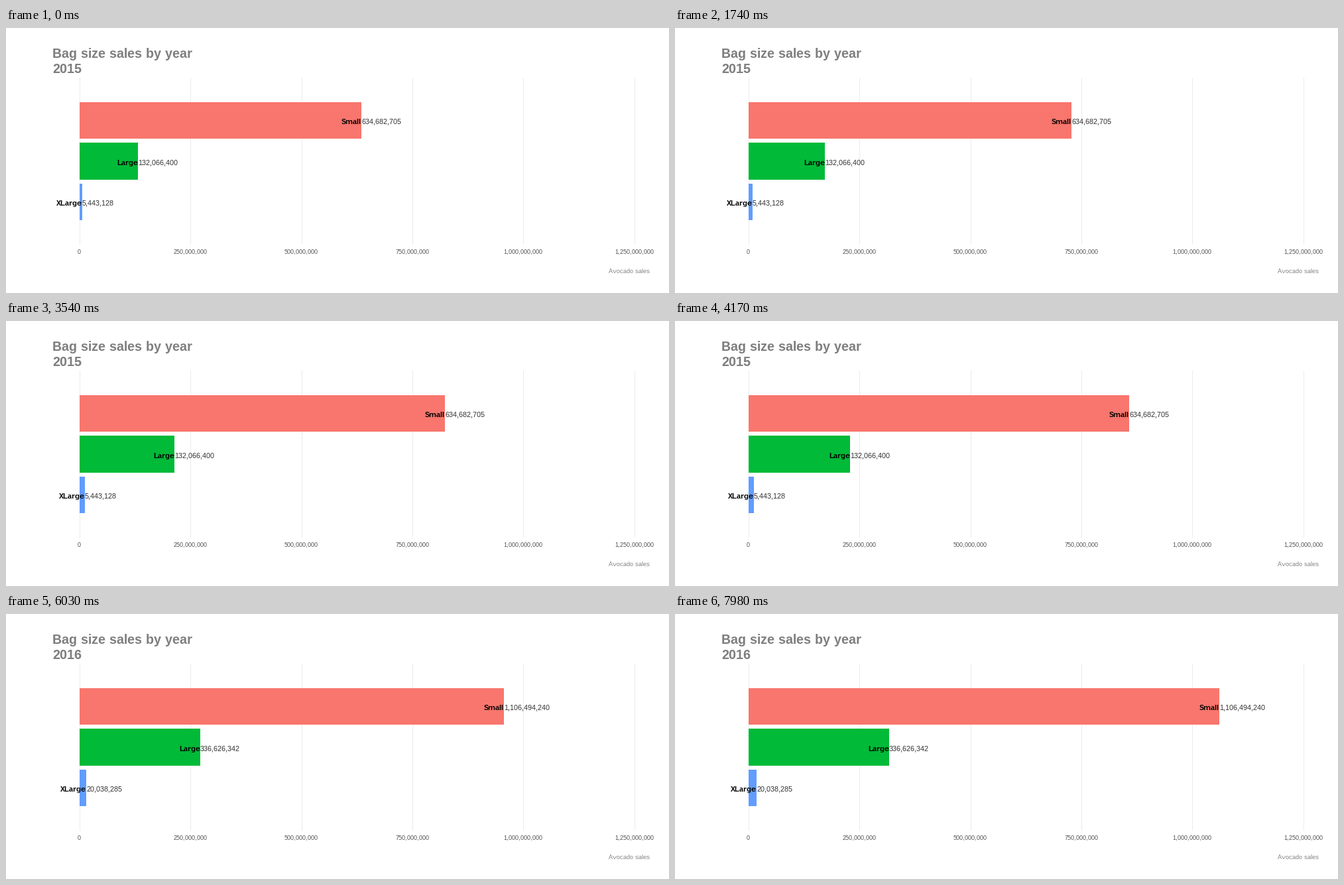
These frames come from a looping animation (1000 by 400 pixels, 8 s). A matplotlib script:

```python
import matplotlib.pyplot as plt
from matplotlib.animation import FuncAnimation
from matplotlib.patches import Rectangle

plt.rcParams.update({
    "font.family": "Liberation Sans",
    "text.hinting": "native",
    "text.hinting_factor": 1,
})

WIDTH, HEIGHT, DPI = 1000, 400, 100
LOOP_MS, TICK_MS, STEP_MS = 8000, 20, 30
STEPS_PER_YEAR = 295.5
ZERO_X, PX_PER_MILLION = 111, 0.6698

# name, colour, top, bottom, sales in 2015 and 2016
BARS = [
    ("Small", "#F8766D", 112, 167, (634_682_705, 1_106_494_240)),
    ("Large", "#00BA38", 173, 229, (132_066_400, 336_626_342)),
    ("XLarge", "#619CFF", 235, 290, (5_443_128, 20_038_285)),
]

fig = plt.figure(figsize=(WIDTH / DPI, HEIGHT / DPI), dpi=DPI, facecolor="white")
ax = fig.add_axes([0, 0, 1, 1])
ax.set(xlim=(0, WIDTH), ylim=(HEIGHT, 0))
ax.axis("off")


def to_x(sales):
    return ZERO_X + sales / 1e6 * PX_PER_MILLION


def box(x, top, width, bottom, color):
    return ax.add_patch(Rectangle((x, top), width, bottom - top, color=color,
                                  linewidth=0, antialiased=False))


def label(x, baseline, text, px, color, **kwargs):
    return ax.text(x, baseline, text, fontsize=px * 72 / DPI, color=color,
                   va="baseline", **kwargs)


for sales in range(0, 1_250_000_001, 250_000_000):
    x = to_x(sales)
    box(int(x + 0.1), 75, 1, 327, "#EBEBEB")
    label(x - 0.5, 341, f"{sales:,}", 9, "#4D4D4D", ha="center")

label(70, 45, "Bag size sales by year", 20, "#7F7F7F", weight="bold")
year_text = label(70, 68, "2015", 20, "#7F7F7F", weight="bold")
label(971, 370, "Avocado sales", 9.5, "#7F7F7F", ha="right")

rows = []
for name, color, top, bottom, totals in BARS:
    baseline = (top + bottom) // 2 + 6
    bar = box(ZERO_X, top, 0, bottom, color)
    name_text = label(ZERO_X, baseline, name, 11, "black", weight="bold", ha="right")
    value_text = label(ZERO_X, baseline, "", 11, "#333333")
    rows.append((bar, name_text, value_text, totals))


def draw(tick):
    step = (tick * TICK_MS + TICK_MS // 2) // STEP_MS
    progress = step / STEPS_PER_YEAR
    year = int(progress >= 0.5)
    year_text.set_text(str(2015 + year))
    for bar, name_text, value_text, totals in rows:
        start, end = totals
        x = round(to_x(start + (end - start) * progress))
        bar.set_width(x - ZERO_X)
        name_text.set_x(x)
        value_text.set_x(x)
        value_text.set_text(f"{totals[year]:,}")
    return []


anim = FuncAnimation(fig, draw, frames=LOOP_MS // TICK_MS, interval=TICK_MS,
                     init_func=lambda: draw(0), repeat=True, repeat_delay=0)
plt.show()
```
